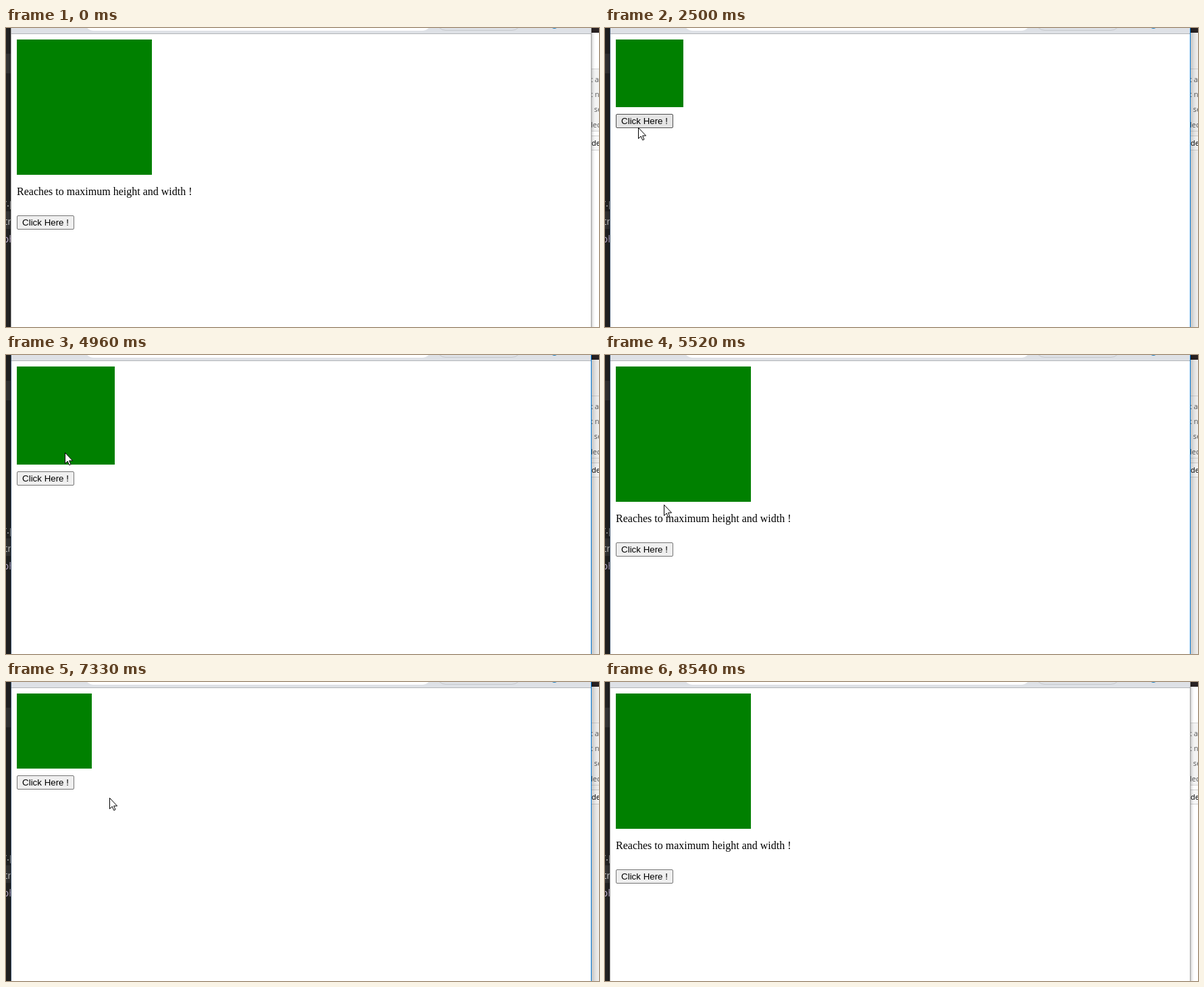
An HTML page for the animation above (8600 ms loop, 878x442 px).

```html
<!DOCTYPE html>
<html lang="en">
<head>
<meta charset="utf-8">
<title>Growing box</title>
<style>
html, body { margin: 0; width: 100%; height: 100%; overflow: hidden; }
div, span, i, svg { position: absolute; box-sizing: border-box; }
#stage { width: 878px; height: 442px; overflow: hidden; background: #fff; }
#editor { width: 8px; height: 442px; background: #232323; font: 15px "Open Sans", sans-serif; color: #ccc; overflow: hidden; }
#editor i { left: 0; width: 8px; background: #343434; }
#editor span, #panel span { line-height: 20px; white-space: pre; }
#panel { left: 866px; width: 12px; height: 442px; overflow: hidden; font: 11px "Open Sans", sans-serif; color: #555; }
#panel i { left: 0; width: 12px; }
#win { left: 7px; top: -20px; width: 860px; height: 482px; background: #fff; border: solid rgba(100,100,100,.6); border-width: 0 1px; box-shadow: 0 0 5px #0006; }
.focused #win { border-color: #0078d7; border-left-color: #3a5068; box-shadow: 0 0 12px #0006; }
.focused #panel { background: #f3f2f1; }
#bar { left: 8px; top: 0; width: 858px; height: 9px; background: #dee1e6; border-bottom: 1px solid #b2b4b8; overflow: hidden; }
#bar div { height: 28px; border-radius: 14px; }
#page { left: 16px; top: 17px; }
#box { position: static; background: green; }
p { margin: 16px 0; font: 16px/18px "Liberation Serif", "Times New Roman", serif; color: #000; white-space: nowrap; }
button { display: block; box-sizing: border-box; width: 85px; height: 21px; margin: 10px 0 0; padding: 0; border: 1px solid #767676; border-radius: 2px; background: #efefef; color: #000; font: 13.333px "Liberation Sans", Arial, sans-serif; white-space: nowrap; pointer-events: none; }
p + button { margin-top: 26px; }
p[hidden] + button { margin-top: 10px; }
button.hover { background: #e5e5e5; border-color: #4f4f4f; }
button.active { background: #f5f5f5; border-color: #8d8d8d; }
#cursor { overflow: visible; left: 0; top: 0; width: 12px; height: 20px; }
</style>
</head>
<body>
<div id="stage">
  <div id="editor">
    <i style="top:38px;height:29px"></i>
    <i style="top:271px;height:26px"></i>
    <span style="left:-5px;top:248px">r.php</span>
    <span style="left:-3px;top:275px">tro</span>
    <span style="left:-5px;top:301px;color:#c9b6d6">php</span>
  </div>
  <div id="panel">
    <i style="top:0;height:7px;background:#2a2324"></i>
    <i style="top:60px;height:93px;background:#f3f3f3;border:solid #d4d4d4;border-width:1px 0"></i>
    <i style="top:159px;height:22px;background:#f8f8f8;border:solid #d0d0d0;border-width:1px 0"></i>
    <span style="left:-1px;top:66px">t a</span>
    <span style="left:-1px;top:88px">t n</span>
    <span style="left:-1px;top:110px">: se</span>
    <span style="left:0;top:133px">led</span>
    <span style="left:1px;top:160px;color:#000">de</span>
  </div>
  <div id="win"></div>
  <div id="bar">
    <div style="left:108px;top:-24px;width:514px;background:#fff"></div>
    <div style="left:629px;top:-24px;width:126px;border:1px solid #c6c8cc"></div>
    <div style="left:798px;top:-11px;width:12px;height:12px;background:#1a7fc1"></div>
  </div>
  <div id="page">
    <div id="box"></div>
    <p id="note">Reaches to maximum height and width !</p>
    <button id="button">Click Here !</button>
  </div>
  <svg id="cursor">
    <circle id="glow" r="12" fill="#ff0" fill-opacity=".5"/>
    <path d="M.5 .5V16.5L4.2 13 6.7 18.7 9 17.7 6.6 12.2H11.6Z" fill="#fff" stroke="#000"/>
  </svg>
</div>
<script>
const LOOP = 8600, STEP = 66;
const [stage, box, note, button, cursor, glow] =
  ['stage', 'box', 'note', 'button', 'cursor', 'glow'].map(id => document.getElementById(id));

// Pointer path: time, x, y
const path = [
  [0, 721, 450], [70, 721, 428], [370, 400, 335], [700, 50, 293],
  [2300, 50, 293], [2500, 49, 147], [2570, 70, 140], [2910, 196, 172],
  [3570, 196, 172], [4160, 87, 144], [5170, 87, 144], [5500, 87, 221],
  [6340, 87, 221], [6670, 84, 154], [6800, 88, 143], [7230, 88, 143],
  [7730, 580, 356], [7990, 803, 450], [LOOP, 803, 450]
];
const clicks = [[900, 970], [4360, 4500], [7050, 7190]];
const stepped = ms => Math.floor(ms / STEP);
const grow = ms => Math.min(200, Math.floor(105 + 6.75 * stepped(ms)));

function boxSize(t) {
  if (t < 1960) return 200;
  if (t < 4510) return 100;
  if (t < 5990) return grow(t - 4510);
  return t < 7200 ? 100 : grow(t - 7200);
}

function pointer(t) {
  const i = path.findIndex(key => key[0] > t);
  const [t0, x0, y0] = path[i - 1], [t1, x1, y1] = path[i];
  const k = stepped(t - t0) * STEP / (t1 - t0);
  return [Math.round(x0 + (x1 - x0) * k), Math.round(y0 + (y1 - y0) * k)];
}

function draw() {
  const t = performance.now() % LOOP;
  const size = boxSize(t), full = size === 200;
  const [x, y] = pointer(t);
  const top = full ? 277 : 27 + size;
  const hover = x >= 16 && x < 101 && y >= top && y < top + 21;
  const pressed = clicks.some(([from, to]) => t >= from && t < to);

  stage.className = t >= 900 && t < 8540 ? 'focused' : '';
  box.style.width = box.style.height = size + 'px';
  note.hidden = !full;
  button.className = hover ? (pressed ? 'active' : 'hover') : '';
  cursor.style.transform = `translate(${x}px, ${y}px)`;
  glow.style.display = pressed ? '' : 'none';
  requestAnimationFrame(draw);
}
draw();
</script>
</body>
</html>
```
